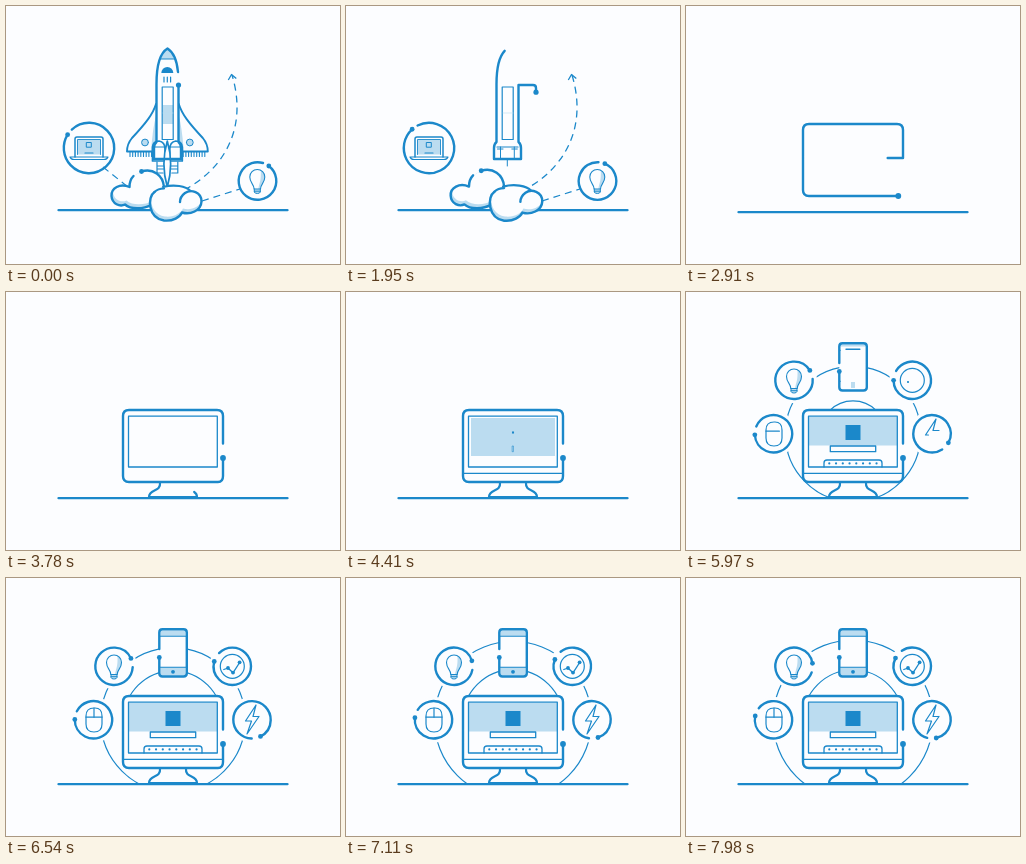
An HTML page with a canvas that plays this animation: 334x258 px, repeating every 8 s.

```html
<!DOCTYPE html>
<html lang="en">
<head>
<meta charset="utf-8">
<title>Launch</title>
<style>
  html, body { margin: 0; width: 100%; height: 100%; overflow: hidden; background: #fcfdff; }
  canvas { display: block; width: 334px; height: 258px; }
  svg { position: absolute; }
</style>
</head>
<body>
<canvas id="stage"></canvas>
<svg width="0" height="0"><path id="ruler"/></svg>
<script>
const W = 334, H = 258, LOOP = 8000;
const BLUE = '#1b88ca', LIGHT = '#bbdcf0', BG = '#fcfdff';
const canvas = document.getElementById('stage');
const ruler = document.getElementById('ruler');
const ctx = canvas.getContext('2d');
const dpr = window.devicePixelRatio || 1;
canvas.width = W * dpr;
canvas.height = H * dpr;

// ---- timing ----
const clamp = x => Math.max(0, Math.min(1, x));
const ramp = (t, a, b) => { const x = clamp((t - a) / (b - a)); return x * x * (3 - 2 * x); };

// Smooth curve through [time, value] pairs, without overshoot between them.
function curve(t, keys) {
  const n = keys.length - 1;
  if (t <= keys[0][0]) return keys[0][1];
  if (t >= keys[n][0]) return keys[n][1];
  const i = keys.findIndex(k => k[0] > t) - 1;
  const secant = j => (keys[j + 1][1] - keys[j][1]) / (keys[j + 1][0] - keys[j][0]);
  const slope = j => {
    if (j === 0 || j === n) return 0;
    const a = secant(j - 1), b = secant(j);
    return a * b <= 0 ? 0 : 2 * a * b / (a + b);
  };
  const [t0, a] = keys[i], [t1, b] = keys[i + 1], d = t1 - t0, x = (t - t0) / d;
  const y = 1 - x;
  return a * (1 + 2 * x) * y * y + slope(i) * d * x * y * y
       + b * x * x * (3 - 2 * x) - slope(i + 1) * d * x * x * y;
}

// ---- drawing ----
const lengths = {};
function lengthOf(d) {
  if (!(d in lengths)) {
    ruler.setAttribute('d', d);
    lengths[d] = ruler.getTotalLength();
  }
  return lengths[d];
}

function stroke(d, width = 1.2, color = BLUE) {
  ctx.strokeStyle = color;
  ctx.lineWidth = width;
  ctx.stroke(new Path2D(d));
}

function fill(d, color = BG) {
  ctx.fillStyle = color;
  ctx.fill(new Path2D(d));
}

function span(d, from, to, width) {
  if (to - from < 0.1) return;
  ctx.save();
  ctx.setLineDash([to - from, lengthOf(d) * 2]);
  ctx.lineDashOffset = -from;
  stroke(d, width);
  ctx.restore();
}

const grow = (d, p, width = 1.2) => span(d, 0, lengthOf(d) * p, width);

function disc(x, y, r, color = BLUE) {
  if (r <= 0) return;
  ctx.fillStyle = color;
  ctx.beginPath();
  ctx.arc(x, y, r, 0, Math.PI * 2);
  ctx.fill();
}

function circle(x, y, r, width = 1.2, a = 0, b = Math.PI * 2) {
  ctx.strokeStyle = BLUE;
  ctx.lineWidth = width;
  ctx.beginPath();
  ctx.arc(x, y, r, a, b);
  ctx.stroke();
}

function box(x, y, w, h, color) {
  ctx.fillStyle = color;
  ctx.fillRect(x, y, w, h);
}

function at(x, y, scale, draw) {
  if (scale <= 0) return;
  ctx.save();
  ctx.translate(x, y);
  ctx.scale(scale, scale);
  draw();
  ctx.restore();
}

function mirrored(axis, draw) {
  draw();
  ctx.save();
  ctx.translate(2 * axis, 0);
  ctx.scale(-1, 1);
  draw();
  ctx.restore();
}

// Open ring led by a dot; dir is the side of the dot where the gap lies.
function ring(x, y, r, deg, gap, p, dir = 1) {
  if (p <= 0) return;
  const rad = Math.PI / 180, head = deg * rad;
  const tail = head - dir * (360 - gap) * rad * p;
  circle(x, y, r, 2.4, Math.min(head, tail), Math.max(head, tail));
  disc(x + r * Math.cos(head), y + r * Math.sin(head), 2.4);
}

// ---- the line that leaves the rocket and becomes the monitor ----
const HULL = 'M172 66C171 55 167 46 161.5 42.5C154 47 150.5 60 150.5 78V136Q148 138 148 142V153H175V142Q175 138 172.5 136V79';
const BEND = HULL + 'H187Q190 79 190 82';
const DROP = BEND + 'V149Q190 152 193 152';
const CASE = DROP + 'H217V124Q217 118 211 118H123Q117 118 117 124V184Q117 190 123 190H212';
const TRAIL = CASE + 'Q217 190 217 184V166';

function trail(t) {
  const head = curve(t, [[1650, lengthOf(HULL)], [1950, lengthOf(BEND + 'V86')],
    [2910, lengthOf(CASE)], [3030, lengthOf(TRAIL)]]);
  const tail = curve(t, [[1650, 0], [1950, 30],
    [2910, lengthOf(DROP + 'H201')], [3030, lengthOf(DROP + 'H217')]]);
  span(TRAIL, tail, head, 2.4);
  ruler.setAttribute('d', TRAIL);
  const p = ruler.getPointAtLength(head);
  disc(p.x, p.y, t > 2400 ? 2.9 : 2.6);
}

// ---- rocket scene ----
const WING = 'M150 98C147 108 140 117 126 132Q121 138 121 145.5H148';
const BOOSTER = 'M146.5 155V141Q147 135 153 135Q159 136 159 143V155Z';
const FLAME = 'M161.3 135Q154.5 158 161.3 181Q168 158 161.3 135Z';

function wing(keep) {
  if (keep > 0.95) {
    fill(WING + 'L150 98Z');
    fill('M150 110Q147 120 145 145H150Z', LIGHT);
  }
  grow(WING, keep, 1.9);
  at(139, 136.5, keep, () => { disc(0, 0, 3.4, LIGHT); circle(0, 0, 3.4, 1); });
  for (let x = 124; x < 148; x += 2.7) {
    if (x < 124 + 24 * keep) stroke(`M${x} 146V150.5`, 1.1);
  }
}

function rocket(t) {
  const keep = 1 - ramp(t, 1650, 1930);
  const late = 1 - ramp(t, 1980, 2300);
  if (keep > 0) mirrored(161.4, () => wing(keep));
  if (keep > 0.95) fill(HULL + 'Z');
  at(161.5, 48, keep, () => {
    fill('M-6.5 5Q-4 -3 0 -5Q4 -3 6.5 5Z', LIGHT);
    stroke('M-7 5H7', 1.2);
  });
  at(161.3, 67, keep, () => fill('M-6 0A6 6 0 0 1 6 0Z', BLUE));
  for (const x of [158, 161.3, 164.6]) grow(`M${x} 71V76`, keep, 1.2);

  if (late > 0) {
    const h = 19 * keep;
    box(157, 108.5 - h / 2, 10, h, LIGHT);
    grow('M156.2 81H167.2V133.5H156.2Z', late, 1.2);
    stroke('M157 107H167', 0.6 * late, LIGHT);
    grow('M151 141H172', late);
    mirrored(161.4, () => grow('M154.5 141V152M151.5 143H157', late, 1));
    grow('M161.3 153V160', late, 1);
  }
  if (keep > 0) {
    mirrored(161.4, () => {
      if (keep > 0.9) fill(BOOSTER);
      grow(BOOSTER, keep, 1.7);
      grow('M147 141H159', keep, 1);
      grow('M151 156V167H157M151 160H158M151 163H158', keep, 1.2);
    });
    if (keep > 0.9) fill(FLAME);
    grow(FLAME, keep, 1.7);
  }
}

const PUFF = 'M127.5 170Q123.5 174 123.5 181C114 177 105 182 105.5 190C106 198 114 201 119 198.5C125 204 138 203 145 199';
const PUFF_TOP = 'M135.5 165.5C147 162 157 169 158 181';
const BILLOW = 'M148.5 186C141 191 142 212 158 214.5C167 215.5 174 211 176 206.5C184 209 195 205 195.5 195.5C195.5 186 185 183 179 187C175 190 174 193 174 196';

function shaded(d, dx, dy) {
  const p = new Path2D(d);
  ctx.save();
  ctx.fillStyle = LIGHT;
  ctx.fill(p);
  ctx.clip(p);
  ctx.translate(dx, dy);
  ctx.fillStyle = BG;
  ctx.fill(p);
  ctx.restore();
}

function clouds(t) {
  const keep = 1 - ramp(t, 2020, 2520);
  const swell = 1 + 0.018 * ramp(t, 0, 1800);
  at(152, 204, keep * swell, () => {
    ctx.translate(-152, -204);
    shaded(PUFF + 'L158 181C157 169 147 162 135.5 165.5Z', 1.5, -4);
    stroke(PUFF, 2.4);
    stroke(PUFF_TOP, 2.4);
    disc(135.5, 165.5, 2.4);
    const body = BILLOW + 'L184.5 185C180 180 168 178 156 181Z';
    shaded(body, 1, -4);
    stroke(BILLOW, 2.4);
    stroke('M157 181C168 178 180 180 184.5 185', 2.2);
    stroke('M148.5 186C151 183.5 154 182.5 158 182.5', 2.2);
  });
}

function routes(t) {
  ctx.save();
  ctx.lineCap = 'butt';
  const left = 1 - ramp(t, 1650, 1920);
  const right = 1 - ramp(t, 2000, 2350);
  const floor = 258 - 192 * ramp(t, 1980, 2620);
  ctx.setLineDash([7, 5]);
  if (left > 0) stroke(`M${122 - 25 * left} ${181 - 20 * left}L122 181`);
  if (right > 0) stroke(`M196 195L${196 + 38 * right} ${195 - 12 * right}`);
  ctx.beginPath();
  ctx.rect(0, 0, W, floor);
  ctx.clip();
  ctx.lineDashOffset = 3 * (1 - ramp(t, 0, 810));
  stroke('M226 69C242 122 218 162 180 183', 1.3);
  ctx.setLineDash([]);
  stroke('M222.3 74L225.5 68.5L230.3 72.5', 1.3);
  ctx.restore();
}

function laptop() {
  stroke('M-14 9V-9Q-14 -11 -12 -11H12Q14 -11 14 -9V9', 1.5);
  box(-11.5, -8.5, 23, 15, LIGHT);
  stroke('M-11.5 6.5V-8.5H11.5V6.5', 0.9);
  stroke('M-2.3 -5.5H2.3V-0.8H-2.3Z', 1);
  stroke('M-4 5H4', 1.2);
  stroke('M-19 9H19Q18 11.5 15 11.5H-15Q-18 11.5 -19 9Z', 1.2);
}

function bulb() {
  const glass = 'M-3.2 8C-3.2 3 -7.5 2 -7.5 -4A7.5 7.5 0 0 1 7.5 -4C7.5 2 3.2 3 3.2 8Z';
  fill(glass);
  fill('M1 8C2 2 4 0 3.5 -10.5Q7.5 -8 7.5 -4C7.5 2 3.2 3 3.2 8Z', LIGHT);
  box(-3, 8, 6, 4, LIGHT);
  stroke(glass, 1.1);
  stroke('M-3 8V11Q-2.5 12.5 0 12.5Q2.5 12.5 3 11V8M-3 10.2H3', 1);
}

function launch(t) {
  if (t > 2700) return;
  routes(t);
  rocket(t);
  clouds(t);
  const a = 1 - ramp(t, 2000, 2480), b = 1 - ramp(t, 2060, 2540);
  ring(83, 142, 25.2, curve(t, [[0, 212], [1950, 228], [2500, 290]]), 15, a);
  at(83, 142, a, laptop);
  ring(251.5, 175, 18.8, curve(t, [[0, -53], [1950, -67], [2540, -120]]), 20, b, -1);
  at(251.3, 175, b, bulb);
}

// ---- computer scene ----
function orbits(t) {
  if (t < 5610) return;
  const outer = curve(t, [[5610, 24], [5970, 67.5], [6170, 97], [6500, 71.5], [6800, 85.5], [7080, 78.5], [7300, 80]]);
  const inner = curve(t, [[5700, 0], [5970, 33], [6250, 58], [6600, 48.5], [6900, 52], [7200, 50]]);
  ctx.save();
  ctx.beginPath();
  ctx.rect(0, 0, W, 206);
  ctx.clip();
  circle(167, 142, outer, 1.2);
  circle(167, 142, inner, 1.2);
  ctx.restore();
}

const STAND = 'M154 191C155 200 143 197 143 205H191C191 197 179 200 180 191';

function monitor(t) {
  if (t < 3030) return;
  if (t > 3900) fill(STAND + 'Z');
  grow(STAND, ramp(t, 3300, 3940), 2.2);
  fill('M123 118H211Q217 118 217 124V184Q217 190 211 190H123Q117 190 117 184V124Q117 118 123 118Z');
  const half = curve(t, [[4050, 0], [4410, 42], [4700, 44]]);
  const top = curve(t, [[4050, 145], [4410, 126], [4700, 125]]);
  const bottom = curve(t, [[4050, 145], [4410, 164], [4760, 153.5]]);
  if (half > 0) box(167 - half, top, half * 2, bottom - top, LIGHT);
  grow('M122.5 124.2H211.3V175H122.5Z', ramp(t, 3180, 3800), 1.3);
  grow('M118 181.3H216', ramp(t, 3990, 4350), 1.3);

  const sq = curve(t, [[4370, 0], [4410, 1], [4740, 7.5]]);
  box(167 - sq, 140.5 - sq, sq * 2, sq * 2, BLUE);
  const w = curve(t, [[4390, 0], [4410, 0.4], [4800, 22.7]]);
  if (w > 0) {
    const frame = `M${167 - w} 154H${167 + w}V159.7H${167 - w}Z`;
    fill(frame);
    stroke(frame, Math.min(1.3, 0.6 + w / 10));
  }
  const bar = ramp(t, 4800, 5250);
  grow('M138 175V171Q138 168 141 168H193Q196 168 196 171V175', bar, 1.3);
  for (let i = 0; i < 8; i++) disc(143.3 + 6.75 * i, 171.4, 1.1 * ramp(t, 4950 + 50 * i, 5150 + 50 * i));
}

function phone(t) {
  const p = ramp(t, 5050, 5560);
  if (p <= 0) return;
  const bars = ramp(t, 5950, 6300);
  const shell = 'M153.3 71V54.5Q153.3 51.3 156.5 51.3H177.5Q180.8 51.3 180.8 54.5V95.3Q180.8 98.5 177.5 98.5H156.5Q153.3 98.5 153.3 95.3V79.5';
  if (p > 0.6) fill(shell + 'Z');
  if (p > 0.9) {
    box(154.5, 52.5, 25, 2 + 3.5 * bars, LIGHT);
    const b = 8.5 * bars;
    box(154.5, 97.5 - b, 25, b, LIGHT);
    if (bars < 1) box(165, 90, 4, 6 * (1 - bars) , LIGHT);
  }
  grow(shell, p, 2.4);
  grow('M160 57.3H174', ramp(t, 5500, 5800) * (1 - bars), 1.4);
  grow('M154 58.2H180', bars, 1.1);
  grow('M154 89.3H180', bars, 1.1);
  disc(167, 93.8, 1.9 * bars);
  ruler.setAttribute('d', shell);
  const dot = ruler.getPointAtLength(lengthOf(shell) * p);
  disc(dot.x, dot.y, 2.4);
}

// Each badge: centre, start time, dot angles at three moments, gap, contents.
const BADGES = [
  { x: 87.5, y: 141.8, start: 4800, deg: [177, 181, 192], gap: 26, draw: mouse },
  { x: 108, y: 88.3, start: 4930, deg: [-32, -25, -9], gap: 28, draw: (t, p) => at(108, 88.5, p, bulb) },
  { x: 226.3, y: 88.3, start: 5200, deg: [180, 195, 206], gap: 30, draw: chart },
  { x: 246, y: 141.8, start: 5460, deg: [29, 63, 77], gap: 28, draw: bolt }
];

function mouse(t, p) {
  grow('M88 130H89Q96 130 96 138V146Q96 154 88 154Q80 154 80 146V138Q80 130 88 130', p);
  grow('M80 139.2H96', ramp(t, 5600, 6100));
  grow('M88 139.2V130', ramp(t, 6000, 6400));
}

function chart(t, p) {
  circle(226.3, 88.3, 12 * p, 1.2);
  grow('M217.8 91.5L222 90L227 94.8L234.3 83.5', ramp(t, 5960, 6400), 1.3);
  const dots = [[218.5, 91.3], [222, 90], [227, 94.6], [233.6, 84.3]];
  dots.forEach(([x, y], i) => {
    if (i) disc(x, y, 1.9 * ramp(t, 5650 + 170 * i, 5930 + 170 * i));
  });
}

function bolt(t) {
  grow('M253 138.5H247L250 127L239.5 143H245.5L241 156L253 138.5', ramp(t, 5600, 6330), 1.2);
}

function badges(t) {
  for (const b of BADGES) {
    const p = ramp(t, b.start, b.start + 480);
    if (p <= 0) continue;
    disc(b.x, b.y, 23 * p, BG);
    const deg = curve(t, [[5970, b.deg[0]], [6540, b.deg[1]], [7980, b.deg[2]]]);
    ring(b.x, b.y, 18.7, deg - 220 * (1 - p), b.gap, p);
    b.draw(t, ramp(t, b.start + 200, b.start + 500));
  }
}

function render(t) {
  ctx.setTransform(dpr, 0, 0, dpr, 0, 0);
  ctx.lineCap = ctx.lineJoin = 'round';
  box(0, 0, W, H, BG);
  const ground = 204.2 + 2 * ramp(t, 2050, 2700);
  orbits(t);
  stroke(`M52.5 ${ground}H281.5`, 2.3);
  launch(t);
  badges(t);
  phone(t);
  monitor(t);
  trail(t);
}

const begin = performance.now();
function tick() {
  render((performance.now() - begin) % LOOP);
  requestAnimationFrame(tick);
}
tick();
</script>
</body>
</html>
```
